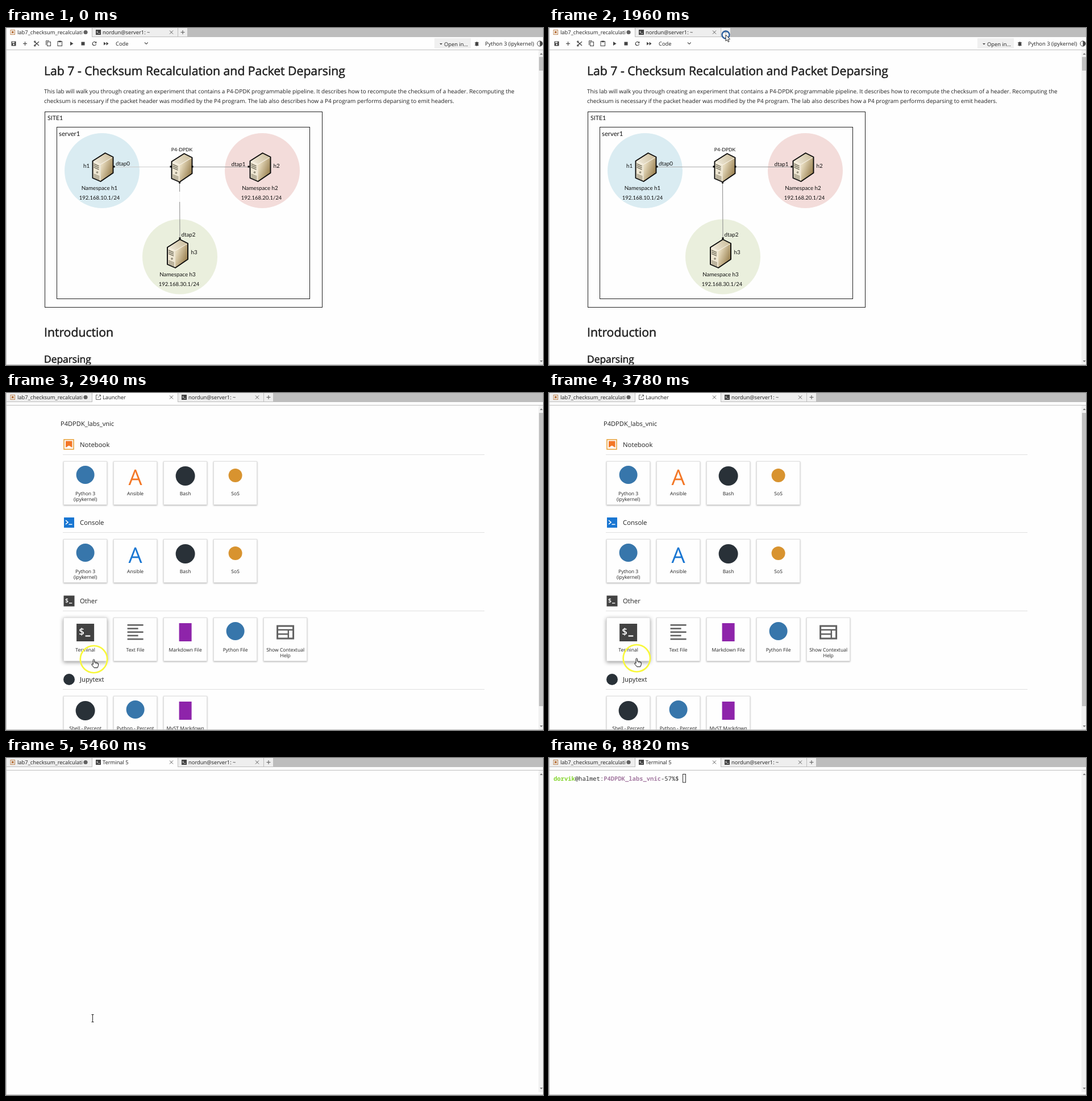
These frames come from a looping animation (945 by 593 pixels, 8910 ms). An HTML page with a canvas:

```html
<!DOCTYPE html>
<html lang="en">
<head>
<meta charset="utf-8">
<title>Notebook lab: opening a terminal</title>
<style>
  html, body { margin: 0; width: 100%; height: 100%; overflow: hidden; background: #fefefe; }
  canvas { display: block; width: 945px; height: 593px; }
</style>
</head>
<body>
<canvas id="stage" width="945" height="593"></canvas>
<script>
const ctx = document.getElementById('stage').getContext('2d');
const LOOP = 8910, STEP = 140;
const LAUNCHER_AT = 2240, TERMINAL_AT = 5040, PROMPT_AT = 7420, BLUR_AT = 8820;
const UI = '"Open Sans", "Noto Sans", sans-serif';
const DIAGRAM = 'Lato, "Open Sans", sans-serif';
const MONO = '"Noto Sans Mono", "DejaVu Sans Mono", monospace';
const INK = '#212121', GREY = '#616161', EDGE = '#bdbdbd', PAPER = '#fefefe';

// ---- helpers ----
function rect(x, y, w, h, color) {
  ctx.fillStyle = color;
  ctx.fillRect(x, y, w, h);
}

function box(x, y, w, h, color, width = 1) {
  ctx.strokeStyle = color;
  ctx.lineWidth = width;
  ctx.strokeRect(x, y, w, h);
}

function line(points, color, width = 1) {
  ctx.strokeStyle = color;
  ctx.lineWidth = width;
  ctx.beginPath();
  points.forEach(p => ctx.lineTo(p[0], p[1]));
  ctx.stroke();
}

function poly(points, fill, stroke, width = 1) {
  ctx.beginPath();
  points.forEach(p => ctx.lineTo(p[0], p[1]));
  ctx.closePath();
  if (fill) { ctx.fillStyle = fill; ctx.fill(); }
  if (stroke) { ctx.strokeStyle = stroke; ctx.lineWidth = width; ctx.stroke(); }
}

function disc(x, y, r, fill) {
  ctx.fillStyle = fill;
  ctx.beginPath();
  ctx.arc(x, y, r, 0, 7);
  ctx.fill();
}

function ring(x, y, r, color, width) {
  ctx.strokeStyle = color;
  ctx.lineWidth = width;
  ctx.beginPath();
  ctx.arc(x, y, r, 0, 7);
  ctx.stroke();
}

function text(s, x, y, size, { font = UI, color = INK, align = 'left', weight = 400 } = {}) {
  ctx.font = `${weight} ${size}px ${font}`;
  ctx.fillStyle = color;
  ctx.textAlign = align;
  ctx.fillText(s, x, y);
}

function heading(s, x, y, size) {
  text(s, x, y, size);
  ctx.strokeStyle = INK;
  ctx.lineWidth = 0.55;
  ctx.strokeText(s, x, y);
}

function at(x, y, draw) {
  ctx.save();
  ctx.translate(x, y);
  draw();
  ctx.restore();
}

const mix = (a, b, k) => a + (b - a) * k;
const ease = k => k * k * (3 - 2 * k);

// ---- frame and tabs ----
function flag(x, y, w, h, color) {
  poly([[x, y], [x + w, y], [x + w, y + h], [x + w / 2, y + h * 0.7], [x, y + h]], color);
}

function shellIcon(x, y, s, color = '#424242') {
  rect(x, y, s, s, color);
  text('$', x + s * 0.13, y + s * 0.66, s * 0.55, { color: '#fff', weight: 600 });
  rect(x + s * 0.5, y + s * 0.66, s * 0.28, Math.max(0.8, s * 0.07), '#fff');
}

function linkIcon(x, y) {
  line([[x + 3, y], [x, y], [x, y + 8], [x + 8, y + 8], [x + 8, y + 5]], GREY);
  line([[x + 3, y + 5], [x + 8, y]], GREY);
  line([[x + 5, y], [x + 8, y], [x + 8, y + 3]], GREY);
}

function plus(x, y, r, color = GREY) {
  line([[x - r, y], [x + r, y]], color, 1.1);
  line([[x, y - r], [x, y + r]], color, 1.1);
}

function tab(x, label, active, icon) {
  rect(x, 0, 150, 15, active ? PAPER : '#eee');
  if (active) rect(x, 14, 150, 3, PAPER);
  rect(x + 150, 0, 1, 16, EDGE);
  if (icon === 'link') linkIcon(x + 6.5, 3.5);
  else shellIcon(x + 6, 3, 9);
  text(label, x + 18, 11, 9.35);
  line([[x + 136, 4.5], [x + 142, 10.5]], GREY);
  line([[x + 142, 4.5], [x + 136, 10.5]], GREY);
}

function tabBar(scene) {
  rect(0, 0, 945, 15, EDGE);
  rect(0, 15, 945, 1, EDGE);
  rect(1, 0, 150, 15, scene ? '#eee' : PAPER);
  if (!scene) rect(1, 14, 150, 3, PAPER);
  rect(151, 0, 1, 16, EDGE);
  box(8, 3.5, 7.5, 8, '#c08a58');
  flag(10, 5.5, 3.5, 4.5, '#b5713a');
  ctx.save();
  ctx.beginPath();
  ctx.rect(18, 0, 116.5, 16);
  ctx.clip();
  text('lab7_checksum_recalculation', 20, 11, 9.35);
  ctx.restore();
  disc(140, 7.5, 3.6, GREY);
  const user = 'nordun@server1: ~';
  let end = 303;
  if (scene) {
    tab(152, scene === 1 ? 'Launcher' : 'Terminal 5', true, scene === 1 ? 'link' : 'shell');
    tab(303, user, false, 'shell');
    end = 454;
  } else {
    tab(152, user, false, 'shell');
  }
  rect(end, 0, 16, 15, '#eee');
  plus(end + 8, 7.5, 3.5);
  if (scene) rect(0, 21, 945, 1, EDGE);
}

function scrollbar(top, bottom, thumbTop, thumbH, downY) {
  rect(937, top, 8, bottom - top, '#f1f1f1');
  if (thumbH) rect(938, thumbTop, 7, thumbH, '#c1c1c1');
  const y = top + 6;
  poly([[939.5, y + 2], [944.5, y + 2], [942, y - 1]], '#777');
  poly([[939.5, downY - 1], [944.5, downY - 1], [942, downY + 2]], '#777');
}

// ---- notebook ----
function toolbar() {
  const c = '#424242';
  rect(9.5, 23.5, 8, 8, c);
  rect(11, 24.5, 4, 2, '#fff');
  disc(13.5, 29, 1.3, '#fff');
  plus(33.5, 27.5, 3.5, c);
  line([[50, 24], [58, 31]], c, 1.2);
  line([[50, 31], [58, 24]], c, 1.2);
  ring(50.8, 24, 1.3, c, 1);
  ring(50.8, 31, 1.3, c, 1);
  box(72.5, 24.5, 6, 7, c);
  line([[70.5, 30], [70.5, 22.5], [76, 22.5]], c);
  box(91, 23.5, 7.5, 8, c);
  rect(92.5, 22.5, 4.5, 2.5, c);
  poly([[113, 24], [118.5, 27.5], [113, 31]], c);
  rect(132.5, 24.5, 6, 6, c);
  ctx.strokeStyle = c;
  ctx.lineWidth = 1.2;
  ctx.beginPath();
  ctx.arc(155.5, 27.5, 3.2, 0.3, 5.4);
  ctx.stroke();
  poly([[156, 26.7], [159.3, 26.7], [159.3, 23.4]], c);
  poly([[172, 24.5], [176, 27.5], [172, 30.5]], c);
  poly([[176.5, 24.5], [180.5, 27.5], [176.5, 30.5]], c);
  text('Code', 193, 31, 9.35);
  line([[244, 25.5], [246.8, 28.3], [249.6, 25.5]], c, 1.1);
  rect(754, 18, 64, 18, '#f0f0f0');
  poly([[763, 27], [768, 27], [765.5, 29.5]], c);
  text('Open in...', 771, 31.5, 9.35);
  ctx.fillStyle = c;
  ctx.beginPath();
  ctx.ellipse(828.5, 28, 2.5, 3.8, 0, 0, 7);
  ctx.fill();
  for (const y of [25.5, 28, 30.5]) line([[825, y], [832, y]], c, 0.9);
  text('Python 3 (ipykernel)', 843, 31, 9.35);
  ring(939.5, 27.5, 4.6, c, 1);
  ctx.fillStyle = c;
  ctx.beginPath();
  ctx.arc(939.5, 27.5, 4.6, -Math.PI / 2, Math.PI / 2);
  ctx.fill();
  rect(0, 38, 945, 1, EDGE);
}

function server(x, y) {
  at(x, y, () => {
    const side = ctx.createLinearGradient(-3, 0, 19, 8);
    side.addColorStop(0, '#e6dabd');
    side.addColorStop(1, '#947a48');
    const top = ctx.createLinearGradient(-18, 0, 18, -16);
    top.addColorStop(0, '#f7f2e6');
    top.addColorStop(1, '#cbbd9b');
    poly([[-18, -11], [4, -25], [18, -18], [-4, -5]], top);
    poly([[-18, -11], [-4, -5], [-4, 25], [-18, 19]], '#eee6d2');
    poly([[-4, -5], [18, -18], [18, 10], [-4, 25]], side);
    line([[-18, -11], [-4, -5], [18, -18]], '#fffaf0', 0.9);
    for (const dy of [-6, -3, 0]) line([[-16, dy], [-7, dy + 4]], '#54503f', 1.2);
    ring(-10, 9, 1.2, '#54503f', 0.9);
    for (const dy of [12, 14, 16, 18]) line([[-16, dy], [-6, dy + 4]], '#746b52', 0.8);
    ctx.lineJoin = 'round';
    poly([[-18, -11], [4, -25], [18, -18], [18, 10], [-4, 25], [-18, 19]], null, '#0b0b0b', 1.9);
  });
}

function diagram(t) {
  const label = (s, x, y, size = 9.8, align = 'left') =>
    text(s, x, y, size, { font: DIAGRAM, color: '#111', align });
  box(68.5, 147.5, 488, 344, '#222');
  box(89.5, 174.5, 445, 302, '#222');
  label('SITE1', 73, 161.5, 10.6);
  label('server1', 93, 190, 11.3);

  disc(169, 251, 66, '#daecf2');
  disc(451, 251, 66, '#f3dcda');
  disc(306, 402.5, 66, '#eaefdd');

  const early = t < 280;
  line([[190, 244.5], [291, 244.5]], early ? '#ccc' : '#aaa');
  line([[328, 244.5], [428, 244.5]], '#999');
  line([[305.5, 271], [306, 371]], '#888');
  if (early) rect(303, 288, 6, 18, 'rgba(255,255,255,.85)');

  server(170.5, 245);
  server(309.5, 246);
  server(447.5, 245);
  server(302, 397);
  for (const [x, y] of [[190, 244], [290, 244], [328, 244], [427, 244], [305.5, 272], [306, 370]])
    rect(x - 1.5, y - 1.5, 3, 3, '#000');

  label('P4-DPDK', 309.5, 217, 8.6, 'center');
  label('h1', 136, 246);
  label('dtap0', 193, 241.5);
  label('dtap1', 396.5, 242.5);
  label('h2', 470.5, 246);
  label('dtap2', 308.5, 366.5);
  label('h3', 325.5, 398);
  [[164.5, 164.5, 284.5], [447, 449.5, 284.5], [302, 304.5, 436.5]].forEach(([x, ipX, y], i) => {
    label(`Namespace h${i + 1}`, x, y, 9.8, 'center');
    label(`192.168.${i + 1}0.1/24`, ipX, y + 17, 9.5, 'center');
  });
}

function notebook(t, mouse) {
  toolbar();
  heading('Lab 7 - Checksum Recalculation and Packet Deparsing', 67, 83, 21.2);
  text('This lab will walk you through creating an experiment that contains a P4-DPDK programmable pipeline. It describes how to recompute the checksum of a header. Recomputing the', 67, 115, 9.97);
  text('checksum is necessary if the packet header was modified by the P4 program. The lab also describes how a P4 program performs deparsing to emit headers.', 67, 132, 9.97);
  diagram(t);
  heading('Introduction', 67, 543, 21.2);
  heading('Deparsing', 67, 589, 17.4);
  if (mouse && mouse.y > 39) poly([[49, 68.5], [53.5, 72], [49, 75.5]], '#aaa');
  scrollbar(39, 592, 51, 24, 586);
}

// ---- launcher ----
const icons = {
  python: () => disc(0, -1, 16, '#3776ab'),
  bash: () => disc(0, 1, 17, '#293138'),
  sos: () => disc(0, 0, 12, '#d8932f'),
  markdown: () => rect(-11, -15, 22, 32, '#8e24aa'),
  orangeA: () => text('A', 0, 17, 38, { color: '#f37726', align: 'center' }),
  blueA: () => text('A', 0, 17, 38, { color: '#1976d2', align: 'center' }),
  shell: () => shellIcon(-15.5, -14, 31),
  lines: () => [28, 19, 28, 19, 28].forEach((w, i) => rect(-14, -13 + i * 6.2, w, 2.6, GREY)),
  help: () => {
    box(-14, -10, 28, 22, GREY, 3);
    rect(-14, -4.5, 28, 2.5, GREY);
    rect(4, -4, 2.5, 15, GREY);
    rect(-14, 3, 19, 2.5, GREY);
  }
};
const kernels = a => [['python', 'Python 3', '(ipykernel)'], [a, 'Ansible'], ['bash', 'Bash'], ['sos', 'SoS']];
const sections = [
  ['Notebook', kernels('orangeA')],
  ['Console', kernels('blueA')],
  ['Other', [['shell', 'Terminal'], ['lines', 'Text File'], ['markdown', 'Markdown File'],
    ['python', 'Python File'], ['help', 'Show Contextual', 'Help']]],
  ['Jupytext', [['bash', 'Shell - Percent'], ['python', 'Python - Percent'], ['markdown', 'MyST Markdown']]]
];
const sectionY = r => Math.floor(137.8 * r);
const cardX = i => Math.floor(101.4 + 88.1 * i);
const cardY = r => 120 + sectionY(r);

function overCard(m, r, i) {
  return m && m.x > cardX(i) && m.x < cardX(i) + 77 && m.y > cardY(r) && m.y < cardY(r) + 77;
}

function card(x, y, [icon, ...words], hover, focus) {
  ctx.save();
  ctx.shadowColor = focus ? 'rgba(45,85,120,.5)' : hover ? 'rgba(0,0,0,.4)' : 'rgba(0,0,0,.3)';
  ctx.shadowBlur = hover ? 7 : 2.5;
  ctx.shadowOffsetY = hover ? 2 : 1;
  rect(x, y, 77, 77, PAPER);
  ctx.restore();
  box(x + 0.5, y + 0.5, 76, 76, focus ? '#47709a' : '#e0e0e0');
  at(x + 38.6, y + 25, icons[icon]);
  words.forEach((w, i) => text(w, x + 38.6, y + 60 + i * 10, 8.55, { align: 'center' }));
}

function launcher(t, mouse) {
  text('P4DPDK_labs_vnic', 96, 58, 11.1);
  const marks = [
    () => { box(102, 82, 17, 17, '#e8a33d', 1.6); flag(105, 84.5, 11.5, 11.5, '#f37726'); },
    () => {
      rect(102, 82, 18, 18, '#1976d2');
      line([[105, 87], [109, 90.5], [105, 94]], '#fff', 1.6);
      rect(110.5, 93.5, 6, 1.4, '#fff');
    },
    () => shellIcon(101.5, 81.5, 19),
    () => disc(111, 91, 10, '#293138')
  ];
  sections.forEach(([name, cards], r) => {
    const dy = sectionY(r);
    at(0, dy, marks[r]);
    text(name, 130, 95 + dy, 11.35);
    rect(100, 108 + dy, 742, 1, '#e0e0e0');
    cards.forEach((c, i) =>
      card(cardX(i), cardY(r), c, overCard(mouse, r, i), r === 2 && i === 0 && t >= 4340));
  });
  scrollbar(22, 592, 35, 516, 586);
}

// ---- terminal ----
function terminal(t) {
  let x = 8;
  if (t >= PROMPT_AT) {
    const parts = [['dorvik', '#83d52c', 700], ['@halmet:', '#2b2b2b', 500],
      ['P4DPDK_labs_vnic', '#a57ba2', 700], ['-57%$ ', '#2b2b2b', 500]];
    for (const [s, color, weight] of parts) {
      text(s, x, 40, 10.5, { font: MONO, color, weight });
      x += s.length * 6.3;
    }
  }
  const lit = Math.floor((t - 5740) / 560) % 2 === 1;
  if (t >= BLUR_AT) box(235.5, 28.5, 5, 14.5, '#333');
  else if (t >= 6300 && lit) rect(Math.round(x), 28, 6.5, 16, GREY);
  scrollbar(22, 588, 0, 0, 581);
}

// ---- mouse ----
const path = [[980, 367.5, 343.5], [1960, 311, 12], [2240, 311, 12], [2940, 154.5, 468.5],
  [3640, 154.5, 468.5], [4340, 152.5, 451.5], [5600, 152.5, 451.5]];

function mouseAt(t) {
  if (t < 980 || t > 5600) return null;
  let i = 0;
  while (i < path.length - 2 && t >= path[i + 1][0]) i++;
  const [t0, x0, y0] = path[i], [t1, x1, y1] = path[i + 1];
  const k = ease((t - t0) / (t1 - t0));
  return { x: mix(x0, x1, k), y: mix(y0, y1, k) };
}

function arrow() {
  poly([[0, 0], [0, 11], [2.5, 8.7], [4.3, 12.6], [6, 11.8], [4.3, 8], [7.5, 7.7]], '#fff', '#111', 0.9);
}

function hand() {
  ctx.lineJoin = 'round';
  poly([[-1.2, 9], [-1.2, 1], [0, 0], [1.2, 1], [1.2, 5.5], [3.5, 5.5], [6, 6.2], [8, 7.4],
    [8, 11], [6.5, 15], [0.5, 15], [-3.8, 9.5], [-3, 8.2]], '#fff', '#111', 1);
  line([[3.6, 6], [3.6, 8.5]], '#111', 0.8);
  line([[5.9, 6.6], [5.9, 8.8]], '#111', 0.8);
}

function beam() {
  line([[-2, 0], [2, 0]], '#222');
  line([[0, 0], [0, 13]], '#222');
  line([[-2, 13], [2, 13]], '#222');
}

function pointer(t, m, scene) {
  const first = t >= 1960 && t < 2240, second = t >= 4340 && t < 4620;
  if (first || second) {
    const r = t === 1960 || t === 4340 ? 6.5 : 9;
    disc(m.x, m.y, r, 'rgba(255,255,255,.5)');
    ring(m.x, m.y, r, '#2f619f', 2.4);
  } else if (t < 4340) {
    ring(m.x, m.y, 23.7, '#f8f83a', 2.6);
  }
  const onCard = scene === 1 && sections.some(([, cards], r) => cards.some((c, i) => overCard(m, r, i)));
  const shape = scene === 2 ? (t < 5460 ? hand : beam) : onCard ? hand : arrow;
  at(m.x, m.y, shape);
}

function draw(now) {
  const t = Math.floor((now % LOOP) / STEP) * STEP;
  const scene = t < LAUNCHER_AT ? 0 : t < TERMINAL_AT ? 1 : 2;
  const mouse = mouseAt(t);
  ctx.textRendering = 'geometricPrecision';
  rect(0, 0, 945, 593, PAPER);
  tabBar(scene);
  if (scene === 0) notebook(t, mouse);
  else if (scene === 1) launcher(t, mouse);
  else terminal(t);
  rect(0, 0, 1, 593, EDGE);
  rect(0, 592, 945, 1, EDGE);
  if (mouse) pointer(t, mouse, scene);
}

const start = performance.now();
function tick() {
  draw(performance.now() - start);
  requestAnimationFrame(tick);
}
tick();
</script>
</body>
</html>
```
